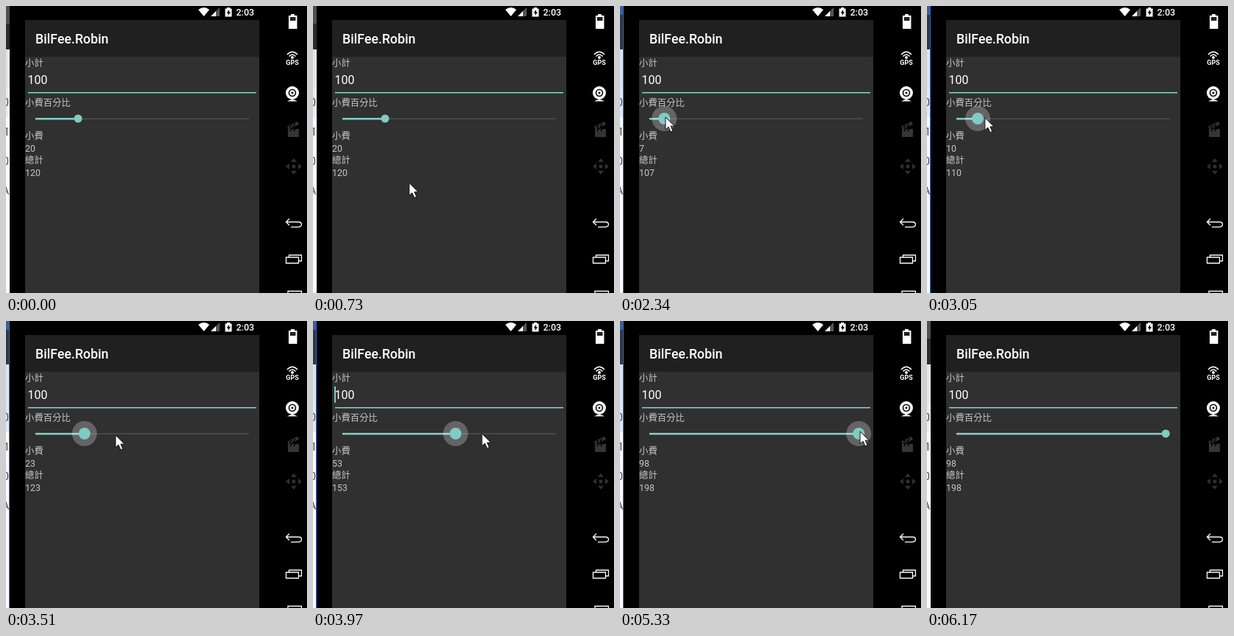
These frames come from a looping animation (410x390 px, 6.25 s). An HTML page:

```html
<!DOCTYPE html>
<html lang="zh-Hant">
<head>
<meta charset="utf-8">
<title>BilFee.Robin</title>
<style>
  html, body { margin: 0; width: 100%; height: 100%; overflow: hidden; background: #000; }
  svg { display: block; }
  text { font-family: Roboto, "Noto Sans CJK TC", "Noto Sans CJK SC", "Noto Sans CJK", sans-serif; fill: #c6c6c6; font-size: 12.4px; }
  .strong { fill: #fff; font-weight: 500; }
  .edge { fill: #444; font-size: 14px; }
  .line { fill: none; stroke: #fff; }
</style>
</head>
<body>
<svg width="410" height="390" viewBox="0 0 410 390">
  <rect width="410" height="390" fill="#000"/>

  <!-- window behind the emulator -->
  <g>
    <rect width="5" height="390" fill="#fcfcfc"/>
    <rect width="5" height="24" fill="#4b514b"/>
    <rect y="24" width="5" height="35" fill="#2c2a2c"/>
    <rect y="59" width="5" height="52" fill="#e6e6e6"/>
    <rect y="111" width="5" height="40" fill="#e9edf4"/>
  </g>
  <g id="active">
    <rect width="5" height="390" fill="#f7f9fd"/>
    <rect width="5" height="12" fill="#3d5f94"/>
    <rect y="12" width="5" height="47" fill="#303744"/>
    <rect y="59" width="5" height="52" fill="#d9e4f2"/>
    <rect y="111" width="5" height="40" fill="#dfe8f6"/>
    <rect x="4" width="1" height="390" fill="#2f62c4"/>
  </g>
  <svg width="5" height="390">
    <text class="edge" x="-4" y="136">0</text>
    <text class="edge" x="-3" y="176">1</text>
    <text class="edge" x="-4" y="216">0</text>
    <text class="edge" x="-5" y="256">A</text>
  </svg>

  <!-- status bar -->
  <path d="M262 5Q269.500 -1 277 5L269.500 14Z" fill="#fff"/>
  <path d="M279 14L291 2V14Z" fill="#555"/>
  <path d="M279 14L286 7V14Z" fill="#fff"/>
  <path d="M301 2h4v1.500h2.500V14.500h-9V3.500h2.500Z" fill="#fff"/>
  <path d="M304 5L300.500 9.500H302.500V13L306 8.300H304Z" fill="#000"/>
  <text class="strong" x="313.500" y="13" style="font-size:12.500px">2:03</text>

  <!-- app -->
  <rect x="26" y="19" width="319" height="371" fill="#303030"/>
  <rect x="26" y="19" width="319" height="50" fill="#202020"/>
  <text class="strong" x="40" y="51" style="font-size:17.800px">BilFee.Robin</text>
  <text x="26" y="82">小計</text>
  <text x="29.500" y="106" style="font-size:16px;fill:#fff">100</text>
  <rect x="30" y="117" width="311" height="1.600" fill="#80cbc4"/>
  <rect id="caret" x="29" y="89" width="2" height="22" fill="#80cbc4"/>
  <text x="26" y="135.500">小費百分比</text>
  <rect x="40" y="152.700" width="291" height="1" fill="#57615d"/>
  <rect id="fill" x="40" y="152" height="2.600" fill="#80cbc4"/>
  <circle id="halo" cy="153" fill="#fff"/>
  <circle id="thumb" cy="153" fill="#80cbc4"/>
  <text x="26" y="180.500">小費</text>
  <text id="tip" x="26" y="197.500"></text>
  <text x="26" y="214">總計</text>
  <text id="total" x="26" y="231"></text>

  <!-- emulator toolbar -->
  <path d="M388 11h5v2h3.500v18h-11.500v-18h3Z" fill="#fff"/>
  <rect x="387" y="15" width="7.500" height="5" fill="#222"/>
  <path class="line" stroke-width="1.500" d="M383 66Q390 58.500 397 66M385.500 68.500Q390 63.500 394.500 68.500"/>
  <circle cx="390" cy="70" r="2" fill="#fff"/>
  <text x="390" y="80" text-anchor="middle" style="font-size:9px;font-weight:700;fill:#fff">GPS</text>
  <circle cx="390" cy="118" r="9" fill="#fff"/>
  <circle cx="390" cy="118" r="4.500" fill="none" stroke="#000" stroke-width="1.600"/>
  <circle cx="390" cy="118" r="1.500" fill="#000"/>
  <path d="M383 129.500Q390 124.500 397 129.500Z" fill="#fff"/>
  <g fill="#383433">
    <path d="M383 164L397 157L399 161L385 167.500ZM384 167H399V178H384Z"/>
    <path d="M386 166l3 -4M391 164l3 -4M387 170l2 -3M392 170l2 -3" stroke="#000" stroke-width="1.500"/>
  </g>
  <g fill="#332f2f">
    <circle cx="392" cy="218" r="2.500"/>
    <path d="M392 207l4 5h-8ZM392 229l4 -5h-8ZM381 218l5 -4v8ZM403 218l-5 -4v8Z"/>
  </g>
  <g class="line" stroke-width="1.300">
    <path d="M386 289L381.500 293.500L386 298M382 293.500H398.500Q402.500 293.500 402.500 296.800T398.500 300.300H388"/>
    <path d="M381.500 341.500H398.500V349.500H381.500ZM385.500 341V338.500H402.500V346.500H398.500"/>
    <path d="M384 390V387.500H402.500V390"/>
  </g>

  <path id="cursor" d="M0 0V17L4 13.300L7 20L10 18.700L7.100 12.200H12.300Z" fill="#fff" stroke="#111" stroke-width="1"/>
</svg>
<script>
const LOOP = 6250, FOCUS = 1410, RELEASE = 5570, BLUR = 6170;
const ENTER = 340, LEAVE = 6030, BLINK = 480;
const el = id => document.getElementById(id);

// time, pointer x, pointer y, slider value
const poses = [
  [ENTER, 190, 395, 20], [950, 98, 154, 20], [FOCUS, 98, 154, 20],
  [2300, 62, 151, 7], [2940, 62, 151, 7], [3510, 149, 155, 23],
  [4420, 309, 151, 82], [4800, 322, 151, 97], [5330, 327, 150, 98],
  [RELEASE, 327, 150, 98], [LEAVE, 300, 395, 98]
];
const blinks = [1100, 2510, 3600];

const clamp = v => Math.min(1, Math.max(0, v));
const mix = (a, b, k) => a + (b - a) * k;

function pose(t) {
  const i = Math.max(1, poses.findIndex(p => p[0] > t));
  const [a, b] = t < LEAVE ? [poses[i - 1], poses[i]] : poses.slice(-2);
  const k = clamp((t - a[0]) / (b[0] - a[0]));
  return a.map((v, n) => mix(v, b[n], k));
}

const set = (id, attrs) => {
  for (const k in attrs) el(id).setAttribute(k, attrs[k]);
};
const show = (id, on) => set(id, { visibility: on ? "visible" : "hidden" });

function draw(t) {
  const [, px, py, raw] = pose(t);
  const value = Math.round(raw);
  const x = 40 + 2.91 * value;
  const press = clamp((t - FOCUS - 80) / 200) * clamp((RELEASE + 250 - t) / 250);

  set("fill", { width: x - 40 });
  set("thumb", { cx: x, r: 5.5 + 2.5 * press });
  set("halo", { cx: x, r: 8 + 9 * press, opacity: 0.25 * press });
  el("tip").textContent = value;
  el("total").textContent = 100 + value;
  set("cursor", { transform: `translate(${px} ${py})` });
  show("cursor", t >= ENTER && t < LEAVE);
  show("caret", blinks.some(b => t >= b && t < b + BLINK));
  show("active", t >= FOCUS && t < BLUR);
}

const start = performance.now();
function frame() {
  draw((performance.now() - start) % LOOP);
  requestAnimationFrame(frame);
}
frame();
</script>
</body>
</html>
```
